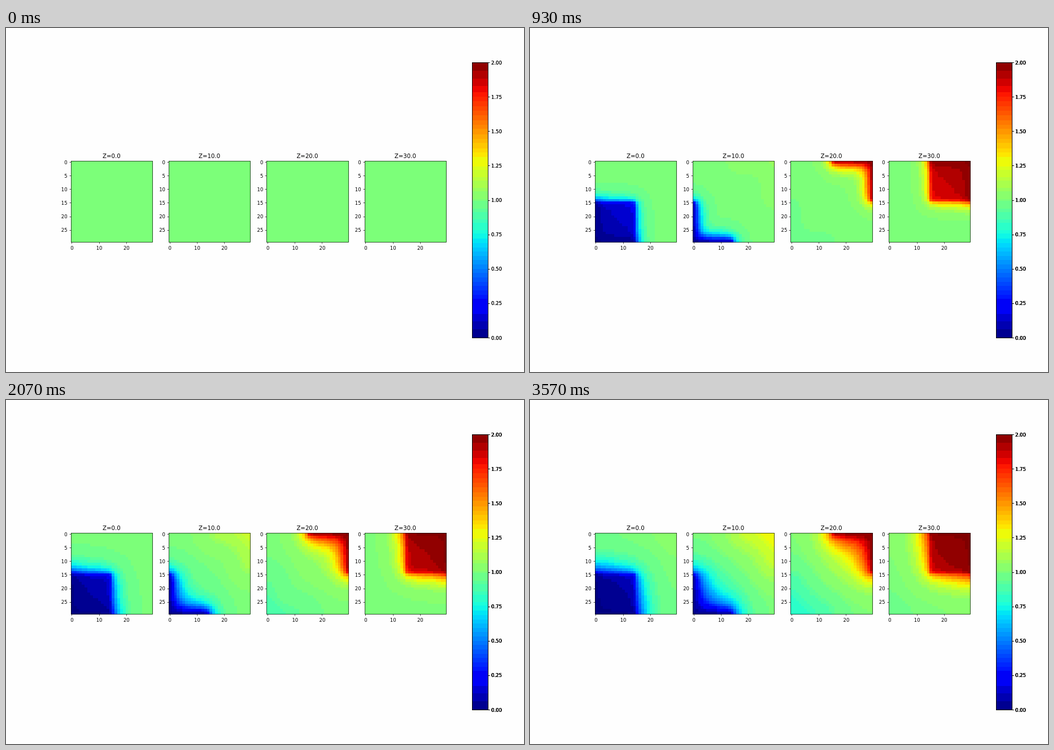
Animation of 917x611 px, one loop 3.6 s. Source, as an HTML page with a canvas:

```html
<!DOCTYPE html>
<html lang="en">
<head>
<meta charset="utf-8">
<title>Diffusion slices</title>
<style>
  html, body { margin: 0; width: 100%; height: 100%; overflow: hidden; background: #fefefe; }
  canvas { display: block; }
</style>
</head>
<body>
<canvas id="stage" width="917" height="611"></canvas>
<script>
const ctx = document.getElementById('stage').getContext('2d');
const N = 30, FRAMES = 120, STEP = 30, SUB = 2, RATE = 0.18 / SUB;
const SLICES = [0, 10, 20, 29];
const DPI = 61.1, pt = v => v * DPI / 72;
const LINE = pt(0.8), TICK = pt(3.5);
const WIDTH = 15 * DPI, SIZE = 0.725 * WIDTH / 4.6, CELL = SIZE / N;
const LEFT = 0.125 * WIDTH, TOP = 236.3;
const BAR = { x: 825.5, y: 61.5, w: 28, h: 489 };
const MAX_LAYERS = 4;

// Heat diffusion in a cube: the outer faces of one octant are held at 0,
// those of the opposite octant at 2, all other faces are insulated.
function simulate() {
  const total = N ** 3, strides = [1, N, N * N];
  const wall = new Uint8Array(total), goal = new Uint8Array(total);
  let u = new Float64Array(total).fill(1), next = new Float64Array(total);
  const half = N / 2, outer = c => c === 0 || c === N - 1 ? 2 : 0;

  for (let z = 0, i = 0; z < N; z++)
    for (let y = 0; y < N; y++)
      for (let x = 0; x < N; x++, i++) {
        const cold = x < half && y >= half && z < half;
        const hot = x >= half && y < half && z >= half;
        if (cold || hot) wall[i] = outer(x) + outer(y) + outer(z);
        goal[i] = hot ? 2 : 0;
      }

  function advance() {
    for (let z = 0, i = 0; z < N; z++)
      for (let y = 0; y < N; y++)
        for (let x = 0; x < N; x++, i++) {
          const v = u[i];
          let flow = wall[i] * (goal[i] - v);
          if (x > 0) flow += u[i - strides[0]] - v;
          if (x < N - 1) flow += u[i + strides[0]] - v;
          if (y > 0) flow += u[i - strides[1]] - v;
          if (y < N - 1) flow += u[i + strides[1]] - v;
          if (z > 0) flow += u[i - strides[2]] - v;
          if (z < N - 1) flow += u[i + strides[2]] - v;
          next[i] = v + RATE * flow;
        }
    [u, next] = [next, u];
  }

  const frames = [];
  for (let f = 0; f < FRAMES; f++) {
    frames.push(SLICES.map(z => u.slice(z * N * N, (z + 1) * N * N)));
    for (let s = 0; s < SUB; s++) advance();
  }
  return frames;
}

// Jet colour map, reduced to 3/4/3 bits with averaged colours.
function makePalette() {
  const ramp = (x, pts) => {
    const k = Math.max(1, pts.findIndex(p => x <= p[0]));
    const [a, b] = [pts[k - 1], pts[k]];
    return Math.floor(255 * (a[1] + (b[1] - a[1]) * (x - a[0]) / (b[0] - a[0])));
  };
  const red = [[0, 0], [.35, 0], [.66, 1], [.89, 1], [1, .5]];
  const green = [[0, 0], [.125, 0], [.375, 1], [.64, 1], [.91, 0], [1, 0]];
  const blue = [[0, .5], [.11, 1], [.34, 1], [.65, 0], [1, 0]];
  const buckets = {}, keys = [];
  for (let i = 0; i < 256; i++) {
    const rgb = [red, green, blue].map(p => ramp(i / 255, p));
    const key = [rgb[0] >> 5, rgb[1] >> 4, rgb[2] >> 5].join();
    const b = buckets[key] ||= { n: 0, sum: [0, 0, 0] };
    const weight = i === 128 ? 800 : 1;
    b.n += weight;
    rgb.forEach((c, k) => b.sum[k] += c * weight);
    keys.push(key);
  }
  return keys.map(k => `rgb(${buckets[k].sum.map(s => Math.floor(s / buckets[k].n))})`);
}

const frames = simulate();
const palette = makePalette();
const color = v => palette[Math.max(0, Math.min(255, Math.floor(v * 128)))];

function line(x1, y1, x2, y2) {
  ctx.beginPath();
  ctx.moveTo(x1, y1);
  ctx.lineTo(x2, y2);
  ctx.stroke();
}

function label(text, x, y, align, size = 10) {
  ctx.font = `${pt(size)}px "DejaVu Sans", sans-serif`;
  ctx.textAlign = align;
  ctx.fillText(text, x, Math.round(y));
}

function drawPanel(values, index) {
  const x0 = LEFT + index * SIZE * 1.2;
  const l = Math.round(x0), r = Math.round(x0 + SIZE), t = 236, b = 380;
  // Nearest sampling at pixel centres
  const edge = (k, from, to) => from + Math.ceil(k * (to + 1 - from) / N - .5);
  for (let y = 0; y < N; y++)
    for (let x = 0; x < N; x++) {
      const px = edge(x, l, r), py = edge(y, t, b);
      ctx.fillStyle = color(values[y * N + x]);
      ctx.fillRect(px, py, Math.min(r + 1, edge(x + 1, l, r)) - px, edge(y + 1, t, b) - py);
    }
  ctx.fillStyle = color(values[N - 1]);

  ctx.fillStyle = '#000';
  ctx.strokeRect(l + .5, t + .5, r - l, b - t);
  for (let v = 0; v < N; v += 5) {
    const y = TOP + (v + .5) * CELL, row = Math.floor(y) + .5;
    line(l + .5 - TICK, row, l + .5, row);
    label(v, x0 - 2 * TICK, y + 3.1, 'right');
  }
  for (let v = 0; v < N; v += 10) {
    const x = x0 + (v + .5) * CELL, col = Math.floor(x) + .5;
    line(col, b + .5, col, b + .5 + TICK);
    label(v, x, 394, 'center');
  }
  label(`Z=${index * 10}.0`, x0 + SIZE / 2, TOP - pt(6), 'center', 12);
}

// The bar's outline, ticks and labels darken with the first redraws.
function drawBar(layers) {
  const { x, y, w, h } = BAR, right = x + w;
  for (let row = 0; row < h; row++) {
    ctx.fillStyle = color(2 * (1 - (row + .5) / h));
    ctx.fillRect(x - .5, y - .5 + row, w, 1);
  }
  ctx.fillStyle = '#000';
  for (let n = 0; n < layers; n++) {
    ctx.strokeRect(x, y, w, h);
    for (let k = 0; k <= 8; k++) {
      const ty = y + h * (1 - k / 8), row = Math.floor(ty) + .5;
      line(right, row, right + TICK, row);
      label((k / 4).toFixed(2), 859, ty + 3.1, 'left');
    }
  }
}

function draw(f) {
  ctx.fillStyle = '#fefefe';
  ctx.fillRect(0, 0, 917, 611);
  ctx.strokeStyle = '#000';
  ctx.lineWidth = LINE;
  frames[f].forEach(drawPanel);
  drawBar(Math.min(f + 2, MAX_LAYERS));
}

let shown = -1;
function tick() {
  const f = Math.floor(performance.now() / STEP) % FRAMES;
  if (f !== shown) draw(shown = f);
  requestAnimationFrame(tick);
}
tick();
</script>
</body>
</html>
```
